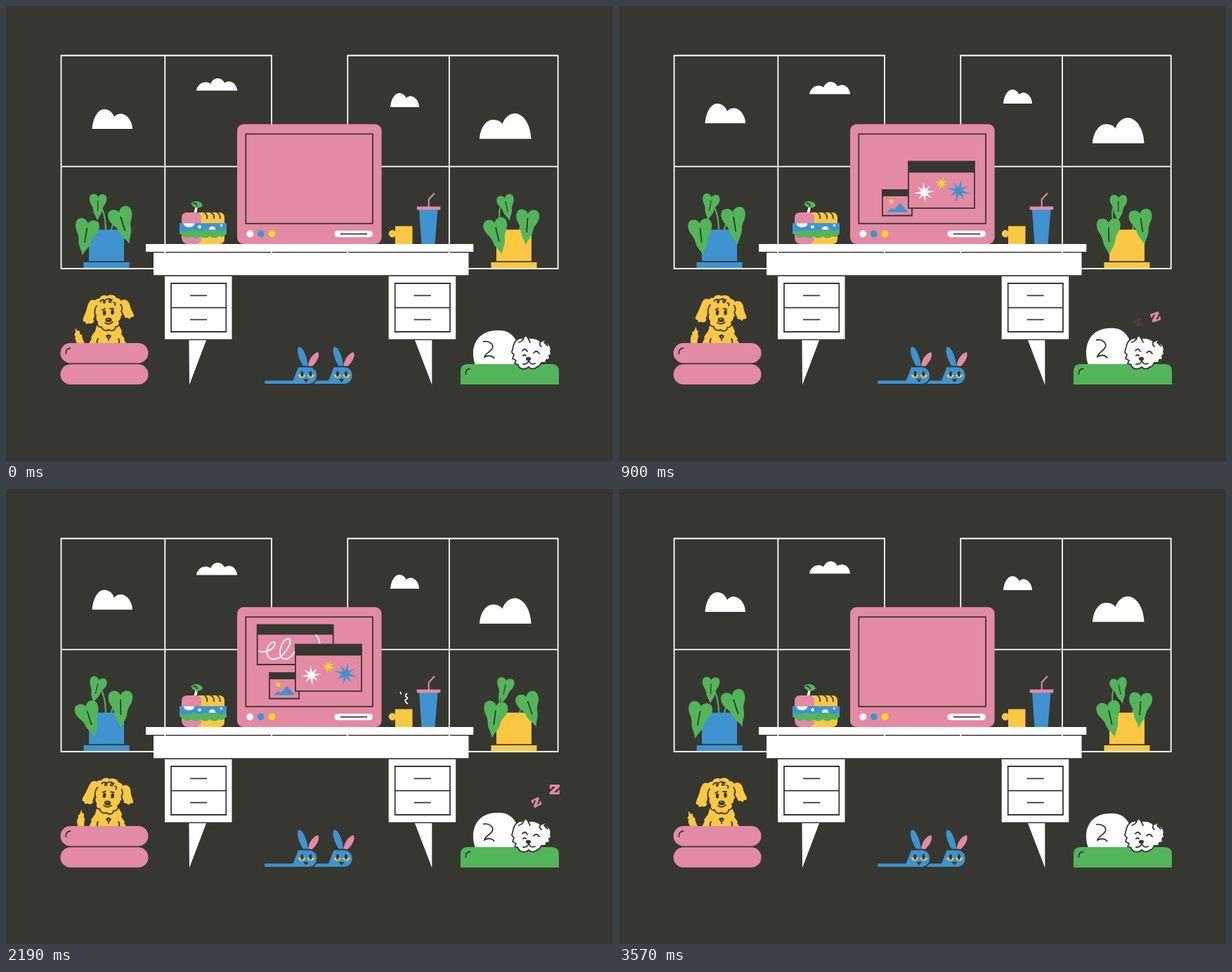
Write an HTML page that moves like this. It is 864 px wide and 648 px high and loops after 3600 ms.

```html
<!DOCTYPE html>
<html lang="en">
<head>
<meta charset="utf-8">
<title>Desk with sleepy dogs</title>
<style>
  html, body { margin: 0; height: 100%; overflow: hidden; background: #373732; }
  svg { display: block; width: 864px; height: 648px; }
  .w { fill: #fff; } .p { fill: #e38aa4; } .b { fill: #3f93d0; }
  .y { fill: #fcc843; } .g { fill: #53b559; } .k { fill: #373732; } .sun { fill: #ffd920; }
  .line { fill: none; stroke: #373732; stroke-width: 1.8; }
  .edge { stroke: #373732; stroke-width: 1.8; }
  .chalk { fill: none; stroke: #fff; stroke-width: 1.8; }
  .stem { fill: none; stroke: #53b559; stroke-width: 2; }
  .round { stroke-linecap: round; stroke-linejoin: round; }
</style>
</head>
<body>
<svg viewBox="0 0 864 648">
  <defs>
    <g id="drawers">
      <path class="w" d="M226 385h95.5v89.5H226z"/>
      <path class="line" d="M235 395h78.3v69H235zM235 429.7h78.3M262 412.3h24M262 446.7h24"/>
    </g>
    <g id="leaf">
      <path class="g" d="M0-6C2-14 17-16 17-3 17 6 10 10 9 18 8 28 3 30 0 40-3 30-8 28-9 18-10 10-17 6-17-3-17-16-2-14 0-6Z"/>
      <path class="line" d="M0 0V21"/>
    </g>
    <g id="slipper">
      <path class="b" d="M424 514C418 506 413 492 416 486 421 483 428 496 430 514Z"/>
      <path class="p" d="M430 514C430 505 437 494 444 493 448 498 441 510 433 515Z"/>
      <path class="b edge" d="M370 532.5H408L415.5 513.5H431C438 513.5 443 519 443 526 443 533 438 538.8 431 538.8H370C366 538.8 366 532.5 370 532.5Z"/>
      <path class="y" d="M416 525h10c0 6-10 6-10 0zM429 525h10c0 6-10 6-10 0z"/>
      <path class="k" d="M423 531h8l-4 5z"/>
      <ellipse class="k" cx="421.5" cy="524" rx="2" ry="4"/>
      <ellipse class="k" cx="433.5" cy="524" rx="2" ry="4"/>
    </g>
    <path id="letter" class="p" d="M-6-6H6V-3L-1 3.6H3.2L4.3 1H6.4L5.6 6H-6.4V3.4L1-3.5H-3L-4.2-1H-6.2Z"/>
  </defs>

  <path class="chalk" d="M78.5 70.5H378V374H78.5zM226.3 70V374M78 228.7H378M486.3 70.5H785.7V374H486.3zM631 70V374M486 228.7H786"/>

  <g class="w">
    <path class="cloud" data-rise="-8" d="M122.5 175C124 160 130 147 140 147 147 147 152 152 154 158 157 154 161 153 165 153.5 174 155 180 166 180 175Z"/>
    <path class="cloud" data-rise="5" d="M271 120.5C272 113 278 108.5 284 108.5 287 108.5 289 109 291 111 293 106 297 103 301 103 305 103 309 105 311 109.5 313 108 316 107.5 318 107.5 324 108 329 114 329 120.5Z"/>
    <path class="cloud" data-rise="-5" d="M547 144C548 133 553 124 560 124 564 124 568 127 569.5 131 572 129 575 128 577 128.5 584 130 588 137 588 144Z"/>
    <path class="cloud" data-rise="6.3" d="M674 189.3C675 174 683 162 693 162 699 162 704 164 706.5 168 710 159 716 153 725 153 738 154 747 171 747.5 189.3Z"/>
  </g>

  <!-- plants -->
  <path class="stem" d="M131 278C138 288 142 300 142 319M163 300C155 305 151 310 150 319M711 277C702 282 699 296 706 319M742 302C735 306 732 312 731 319"/>
  <path class="b" d="M118 318.5h50V363.3H118zM110.5 365h65v8h-65z"/>
  <path class="y" d="M698 318.5h50V363.3H698zM690.5 365h65v8h-65z"/>
  <g id="leaves"></g>

  <!-- desk -->
  <path class="w" d="M199 339H665.3V350H199zM210 351.5H658.5V383.3H210zM260.5 476H285L261 539.5zM582 476H606.3V539.5z"/>
  <use href="#drawers"/>
  <use href="#drawers" x="318.7"/>

  <!-- lunch -->
  <path class="y" d="M274 310V294H303Q311 294 311 302V310zM272 326H311V331Q311 339 303 339H272z"/>
  <path class="p" d="M250 310V302Q250 294 258 294H270Q278 294 278 302V310zM250 326H278V331Q278 339 268 339H260Q250 339 250 329z"/>
  <path class="line" d="M282 294Q287 296 286 303M291 294Q297 296 296 303M300 294Q305 296 305 303"/>
  <path class="b" d="M247 309.5H314V325H247z"/>
  <path class="g" d="M247.5 318H313.5V324Q310 331 303 328 297 333 290 328 284 333 277 328 270 333 264 328 256 333 252 327 247 325 247.5 318Z"/>
  <path class="b" d="M247 309.5H314V318Q306 323 299 318 291 323 284 318 274 323 267 318 256 323 247 320Z"/>
  <path class="w" d="M252.5 309.5H268.5C268 317 253.500 317 252.500 309.500zM288.500 318.500C289 312 298 312 298.500 318.500z"/>
  <circle class="w" cx="275.500" cy="314.500" r="2.300"/>
  <circle class="w" cx="306.500" cy="312.500" r="1.700"/>
  <path class="w" d="M267.500 294L270 285H273L271.500 294z"/>
  <path class="g" d="M263.500 281C267 276 278 277 280 284 276 290 265 288 263.500 281Z"/>
  <path class="line" d="M266 281Q271 280 272 285"/>

  <!-- computer -->
  <rect class="p" x="329" y="168.300" width="205.600" height="170.700" rx="9"/>
  <rect class="line" x="341.300" y="182.300" width="180.700" height="127.500"/>
  <circle class="w" cx="347.300" cy="324.500" r="4.900"/>
  <circle class="b" cx="362.700" cy="324.500" r="4.900"/>
  <circle class="sun" cx="378.500" cy="324.500" r="4.900"/>
  <rect class="w" x="467.500" y="320" width="54.500" height="9.300" rx="4.600"/>
  <path class="line" d="M476 324.700H514"/>

  <!-- pop-ups, drawn around their own centres -->
  <g id="sketch">
    <path class="p edge" d="M-54-28H54V28.500H-54z"/>
    <path class="k" d="M-54-28H54V-14H-54z"/>
    <path class="chalk" d="M-52 9C-45 13-28 7-29-2-32-8-42 3-40 13-37 26-21 21-14 10-8 2-4-7-10-8-18-8-25 10-20 18-14 25-5 18 0 9M29-14Q35-9 35 2"/>
  </g>
  <g id="photo">
    <path class="p edge" d="M-21-18H21V18.500H-21z"/>
    <path class="k" d="M-21-18H21V-9H-21z"/>
    <circle class="sun" cx="-8.500" cy="-1.500" r="3"/>
    <path class="b" d="M-15.500 13.500L-8 8-4 10 4 .5 15.500 13.500z"/>
  </g>
  <g id="sparkle">
    <path class="p edge" d="M-47-33H47V33.500H-47z"/>
    <path class="k" d="M-47-33H47V-17H-47z"/>
  </g>

  <!-- drinks -->
  <path class="y" d="M554 313.500H578.500V339H554z"/>
  <circle class="y" cx="550" cy="324.300" r="5.200"/>
  <path class="b" d="M588 290H614.500L610.500 339H591.500z"/>
  <path class="p" d="M584.800 285.600H618.300V290.300H584.800z"/>
  <path d="M601.700 286V275.500L610 266.500" fill="none" stroke="#e38aa4" stroke-width="2"/>
  <path class="chalk steam" pathLength="1" d="M563 304C564 299 558 299 559.500 296 561 293 564 293 561 289"/>
  <path class="chalk steam" pathLength="1" d="M572 306C566 302 568 300 571 299 573 297 567 296 569 293L571 291"/>

  <!-- sitting dog -->
  <path id="tail" class="y" d="M98.500 458.500L102 463 104 462 106 468 108 468Q108 475 114 483H103Q97 475 99 470L97 469 99 465Z"/>
  <path class="y" d="M129 455H161L165 463 164 467 169 474 168 476 172 481H118L122 473 121 471 127 463Z"/>
  <path class="line round" d="M143 470C147 466 151 472 146 473 143 473 143 469 149 470M146 473V476M131 474Q129 476 130 480M160 474Q162 476 161 480"/>
  <g id="head">
    <path class="y edge" d="M130 425C124 430 129 437 128 441 126 446 129 449 130 450 129 456 133 458 136 457 138 463 144 463 146 461 150 464 156 462 156 457 160 457 163 453 161 449 166 446 164 441 164 437 168 430 164 425 162 422Z"/>
    <path class="y" d="M127 425C124 419 130 416 133 417 134 412 141 411 144 413 149 410 156 412 157 416 163 416 166 421 163 426 170 446 160 445 146 443 130 445 124 440 127 425Z"/>
    <path class="y" d="M128 420C119 415 117 424 115 431 113 439 108 446 110 449L113 450 114 453 118 452C124 454 126 449 127 443L130 426Z"/>
    <path class="y" d="M163 420C172 415 176 422 177 429 179 436 184 440 181 443L178 443 176 446 173 444C168 445 166 440 165 436L162 426Z"/>
    <path class="line round" d="M129 427Q125 432 127 441L125 447M163 425Q167 430 164 435L168 442M134 421C136 417 142 418 141 422 139 425 136 420 143 418 147 415 152 419 149 422 146 423 145 418 151 418M153 422Q157 423 155 426M137 433L141 431M148 431L153 431M141 451Q146 455 152 450"/>
    <ellipse class="k" cx="140" cy="437" rx="2.300" ry="3.800"/>
    <ellipse class="k" cx="151.500" cy="436" rx="2.300" ry="3.800"/>
    <ellipse class="k" cx="146" cy="447" rx="4.600" ry="3.300"/>
    <path class="y" d="M144 445.500h3v1h-3z"/>
  </g>
  <rect class="p" x="77.500" y="480" width="125" height="28.500" rx="14.250"/>
  <rect class="p" x="77.500" y="510.300" width="125" height="28.700" rx="14.350"/>
  <path class="line" d="M85.500 496Q84 488 92 487"/>

  <!-- slippers -->
  <use href="#slipper" x="50.500"/>
  <use href="#slipper"/>

  <!-- sleeping dog -->
  <g id="belly">
    <path class="w" d="M668 511C660 490 667 462 700 462 722 461 732 478 734 511Z"/>
    <path class="line" d="M679 478C688 476 695 482 692 488 689 493 682 495 681 500 686 497 693 498 695 502"/>
  </g>
  <path class="g" d="M647 539V520Q647 510 657 510H777Q787 510 787 520V539z"/>
  <path class="line" d="M654.500 525Q653.500 517 661 516.500"/>
  <path class="w edge" d="M722 485C724 476 730 472 736 473L740 469 743 473C751 472 757 474 761 478L768 475 767 479C773 480 777 486 775 492L776 496 773 498 774 503 769 504 768 508 762 508C760 512 758 514 756 514 752 518 746 517 744 514 739 519 730 517 729 511L724 509 726 505 721 502 723 497 720 493Z"/>
  <path class="line round" d="M737 474Q734 478 730 479M743 473L746 479M761 478Q758 482 762 485M766 479L771 484M735 491Q739 486 742 492M751 494Q755 489 759 495M744 505Q742 511 736 510M744 505Q747 512 753 509M740 498Q738 496 736 498"/>
  <ellipse class="k" cx="743.500" cy="502.500" rx="3.600" ry="2.800"/>
  <g id="snore"></g>
</svg>
<script>
const LOOP = 3600;
const $ = id => document.getElementById(id);
const clamp = x => Math.min(1, Math.max(0, x));
const wave = (t, period) => (1 - Math.cos(2 * Math.PI * t / period)) / 2;
const move = (el, value) => el.setAttribute('transform', value);

function add(parent, tag, attrs) {
  const el = document.createElementNS('http://www.w3.org/2000/svg', tag);
  for (const name in attrs) el.setAttribute(name, attrs[name]);
  return parent.appendChild(el);
}

function star(x, y, radius, turn, fill) {
  const points = Array.from({ length: 16 }, (_, i) => {
    const r = i % 2 ? radius * 0.3 : radius * (i % 4 ? 0.85 : 1);
    const a = turn + i * Math.PI / 8;
    return [x + r * Math.cos(a), y + r * Math.sin(a)].map(v => v.toFixed(1));
  });
  add($('sparkle'), 'polygon', { class: fill, points: points.join(' ') });
}
star(-24.5, 11, 15, -0.1, 'w');
star(0, -1.5, 10, 0.3, 'sun');
star(24.5, 9, 17, 0.25, 'b');

// x, y, resting angle, swung angle, scale
const leaves = [
  [131, 277, 2, 16, 0.72], [163, 300, -18, 1, 1.02], [115.5, 316, 10, -21, 1],
  [711, 278, -12, 14, 0.72], [742.5, 302, 4, -21, 0.97], [697, 315, -13, 10, 1],
].map(pose => ({ pose, el: add($('leaves'), 'use', { href: '#leaf' }) }));

const popups = [
  { el: $('photo'), x: 396, y: 280, from: 365, to: 3012 },
  { el: $('sparkle'), x: 459, y: 254.3, from: 497, to: 3134 },
  { el: $('sketch'), x: 411.7, y: 221.5, from: 1020, to: 2880 },
];

const steam = [...document.querySelectorAll('.steam')].map((el, i) => ({
  el, grow: [1330, 1600][i], fade: [1720, 2190][i],
}));

const clouds = document.querySelectorAll('.cloud');
const letters = [100, 855, 1610].map(born => ({ born, el: add($('snore'), 'use', { href: '#letter' }) }));

// age, x, y, angle, scale
const drift = [
  [0, 738, 451, -32, 0.75], [285, 745, 449, -31, 0.85], [530, 753, 447, -28, 0.95],
  [855, 766, 442, -17, 1.05], [1335, 781, 428, 0, 1.15], [1800, 788, 415, 10, 1.25],
];

function driftAt(age) {
  const i = Math.max(1, drift.findIndex(key => key[0] >= age));
  const [a, b] = [drift[i - 1], drift[i]];
  const k = clamp((age - a[0]) / (b[0] - a[0]));
  return a.map((v, n) => v + (b[n] - v) * k);
}

function backOut(x) {
  const u = clamp(x) - 1;
  return 1 + 2.7 * u ** 3 + 1.7 * u ** 2;
}

function breath(t) {
  const u = t % 1800;
  return u < 1100 ? wave(u, 2200) : wave(1800 - u, 1400);
}

function draw(t) {
  const sway = wave(t, LOOP);
  for (const el of clouds) move(el, `translate(0 ${el.dataset.rise * wave(t, 1800)})`);
  for (const { el, pose: [x, y, a, b, s] } of leaves) {
    move(el, `translate(${x} ${y}) rotate(${a + (b - a) * sway}) scale(${s})`);
  }
  for (const { el, x, y, from, to } of popups) {
    const size = backOut((t < LOOP / 2 ? t - from : to - t) / 400);
    move(el, `translate(${x} ${y}) scale(${size})`);
    el.style.display = size > 0.001 ? '' : 'none';
  }
  for (const { el, grow, fade } of steam) {
    const end = clamp((t - grow) / 380);
    const start = clamp((t - fade) / 600);
    el.setAttribute('stroke-dasharray', `0 ${start} ${end - start} 2`);
    el.style.display = end > start ? '' : 'none';
  }
  for (const { el, born } of letters) {
    const age = t - born;
    const [, x, y, angle, size] = driftAt(Math.min(1800, Math.max(0, age)));
    move(el, `translate(${x} ${y}) rotate(${angle}) scale(${size})`);
    el.setAttribute('opacity', clamp(age / 330) * clamp((1850 - age) / 200));
  }
  move($('tail'), `rotate(${28 * wave(t, 600)} 108 480)`);
  move($('head'), `rotate(${9 * sway} 145 437)`);
  move($('belly'), `translate(0 510) scale(1 ${1 + 0.075 * breath(t)}) translate(0 -510)`);
}

function tick() {
  draw(performance.now() % LOOP);
  requestAnimationFrame(tick);
}
tick();
</script>
</body>
</html>
```
